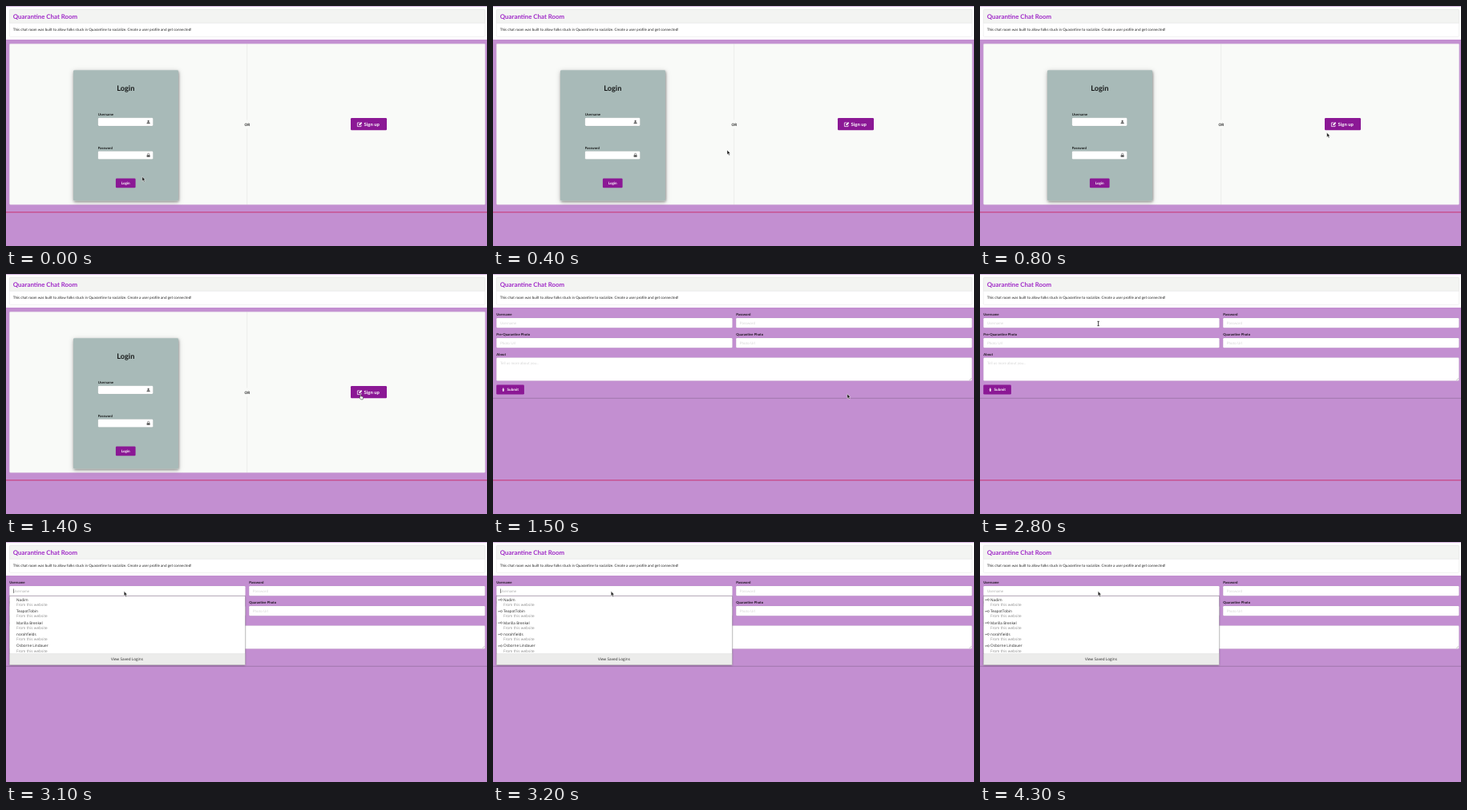
Animation, 600 px wide and 300 px high, one loop 5000 ms. Source, as an HTML page:

```html
<!DOCTYPE html>
<html lang="en">
<head>
<meta charset="utf-8">
<title>Quarantine Chat Room</title>
<style>
  html, body { margin: 0; width: 100%; height: 100%; overflow: hidden; background: #c38fd1; }
  svg { display: block; width: 100vw; height: 100vh; }
  text { font-family: Lato, sans-serif; text-rendering: geometricPrecision; fill: rgba(0,0,0,.87); white-space: pre; }
  .b { font-weight: 700; }
  .w { fill: #fff; }
  .mid { text-anchor: middle; }
  .hint { fill: #d6d6d6; }
  .ui { font-family: "Open Sans", "Noto Sans", sans-serif; fill: #262626; }
  .sub { fill: #8c8c8c; }
  .field { fill: #fff; stroke: #222426; stroke-opacity: .15; stroke-width: .33; }
  .btn { fill: #8b1895; }
  .line { fill: none; stroke: #222426; stroke-opacity: .15; stroke-width: .4; }
</style>
</head>
<body>
<svg id="stage" viewBox="0 0 600 300" preserveAspectRatio="none" xmlns="http://www.w3.org/2000/svg"></svg>
<script>
const BASE = 4.585, LABEL = 4.26, UI = 4.7;
const LOOP = 5000, STEP = 100;

const text = (x, y, size, str, cls = '') =>
  `<text x="${x}" y="${y}" font-size="${size}" class="${cls}">${str}</text>`;
const rect = (x, y, w, h, attrs = '') =>
  `<rect x="${x}" y="${y}" width="${w}" height="${h}" ${attrs}/>`;
const path = (d, attrs = '') => `<path d="${d}" ${attrs}/>`;
const group = (id, body) => `<g id="${id}">${body}</g>`;
const field = (x, y, w, h) => rect(x, y, w, h, 'rx="1.3" class="field"');
const button = (x, y, w, h) => rect(x, y, w, h, 'rx="1.3" class="btn"');

function header() {
  return rect(0, 0, 600, 42, 'fill="#fff"') +
    rect(0, 0, 600, .8, 'fill="#c9a0d5"') +
    rect(4.3, 4.3, 593.3, 34, 'rx="1" fill="#fff"') +
    rect(4.3, 4.3, 593.3, 17, 'rx="1" fill="#f3f4f2"') +
    rect(4.3, 4.3, 593.3, 34, 'rx="1" class="line"') +
    path('M4.3 21.3H597.6', 'class="line"') +
    text(8.8, 15.6, 7.86, 'Quarantine Chat Room', 'b" style="fill:#a02bc8') +
    text(8.8, 31.4, BASE, 'This chat room was built to allow folks stuck in Quarantine to socialize. Create a user profile and get connected!');
}

function loginPage() {
  const userIcon = '<circle cx="177.6" cy="143.9" r="1.1"/>' +
    path('M175.5 147.1V146.4Q175.6 145.2 177.6 145.2T179.7 146.4V147.1Z');
  const lockIcon = rect(175.6, 186.2, 4, 2.6, 'rx=".3"') +
    path('M176.5 186.2V185.3A1.1 1.1 0 0 1 178.7 185.3V186.2', 'fill="none" stroke="#555" stroke-width=".6"');
  const editIcon = path('M441.3 145.9H438.4V150.6H443V148.6', 'fill="none" stroke="#fff" stroke-width=".75"') +
    path('M440.2 149.2L440.4 147.7L443 145L444.2 146.2L441.6 148.9Z', 'fill="#fff"');
  return rect(4.3, 47.2, 593.4, 201.1, 'rx="1.2" fill="#f9faf8" stroke="#d9c9de" stroke-width=".4"') +
    path('M300.7 47.4V142.5M300.7 153.3V248.2', 'class="line"') +
    text(300.8, 149.6, BASE, 'OR', 'b mid') +
    rect(84, 80.2, 131, 163, 'rx="1.2" fill="#a8bab8" filter="url(#shade)"') +
    text(149.3, 106, 9.17, 'Login', 'b mid') +
    text(114.8, 136.8, LABEL, 'Username', 'b') + field(114.8, 139.7, 68.6, 10.2) +
    text(114.8, 178.6, LABEL, 'Password', 'b') + field(114.8, 181.4, 68.6, 10.2) +
    `<g fill="#555">${userIcon}${lockIcon}</g>` +
    button(136.9, 215.4, 24.7, 11.8) + text(149.2, 222.9, BASE, 'Login', 'b w mid') +
    button(430, 140, 45, 15.3) + editIcon + text(446.6, 149.8, 5.9, 'Sign up', 'b w');
}

function formPage() {
  const inputs = [
    [4.3, 55, 'Username', 'Username'], [303.2, 55, 'Password', 'Password'],
    [4.3, 80, 'Pre-Quarantine Photo', 'Photo Url'], [303.2, 80, 'Quarantine Photo', 'Photo Url']
  ];
  return inputs.map(([x, y, label, hint], i) =>
    text(x, y - 3.3, LABEL, label, 'b') + field(x, y, 294.3, 12.3) +
    text(x + 4.6, y + 7.8, BASE, hint, i ? 'hint' : 'hint" id="userHint')).join('') +
    text(4.3, 101.7, LABEL, 'About', 'b') + field(4.3, 104.6, 593.2, 29) +
    text(8.9, 112.7, BASE, 'Tell us more about you...', 'hint') +
    path('M594 132.9L596.9 130M595.6 132.9L596.9 131.6', 'stroke="#777" stroke-width=".35"') +
    button(4.2, 138.6, 34.7, 11.9) +
    '<circle cx="12.8" cy="143.3" r=".8" class="w"/>' +
    path('M11.6 144.2H14V145.3H13.5V146.7H12.1V145.3H11.6Z', 'class="w"') +
    text(17.6, 146.2, BASE, 'Submit', 'b w') +
    path('M0 155.3H600', 'stroke="#000" stroke-opacity=".3" stroke-width=".6"');
}

function popup() {
  const names = ['Nadim', 'TeapotTobin', 'Marilla Brenkel', 'norahfields', 'Osborne Lindauer'];
  const rowY = i => 72 + i * 14.4;
  const rows = names.map((name, i) =>
    text(13, rowY(i) + 1.7, UI, name, 'ui') +
    text(13, rowY(i) + 8, UI, 'From this website', 'ui sub')).join('');
  const keys = names.map((_, i) => {
    const y = rowY(i) + .2;
    return path(`M6.4 ${y}H9.3M7.2 ${y}v1`) + `<circle cx="10.4" cy="${y}" r="1.1"/>`;
  }).join('');
  return rect(4.4, 67.6, 293.8, 86, 'fill="#fff" filter="url(#drop)"') +
    rect(4.4, 139.6, 293.8, 14, 'fill="#ececeb"') +
    path('M4.4 139.6H298.2', 'class="line"') +
    rect(4.4, 67.6, 293.8, 86, 'fill="none" stroke="#8d8d8d" stroke-width=".4"') +
    rows + text(151, 148.3, UI, 'View Saved Logins', 'ui mid') +
    `<g id="keys" fill="none" stroke="#555" stroke-width=".6">${keys}</g>`;
}

function cursors() {
  return group('arrow', path('M0 0V5.7L1.3 4.6L2.3 6.8L3.4 6.3L2.4 4.2H4.1Z',
      'fill="#1a1a1a" stroke="#fff" stroke-width=".5" stroke-linejoin="round"')) +
    group('hand', path('M.9 .6Q1.5 -.1 2 .6V2.6L4.2 3.1Q4.9 3.3 4.8 4.1L4.3 6.6H1.7L0 4.2Q.1 3.5 .9 4Z',
      'fill="#fff" stroke="#1a1a1a" stroke-width=".5" stroke-linejoin="round"')) +
    group('beam', path('M-1.3 -2.7H1.3M0 -2.7V2.7M-1.3 2.7H1.3', 'stroke="#fff" stroke-width="1.3"') +
      path('M-1.2 -2.7H1.2M0 -2.7V2.7M-1.2 2.7H1.2', 'stroke="#111" stroke-width=".75"'));
}

const stage = document.getElementById('stage');
stage.innerHTML = `<defs>
  <filter id="shade" x="-20%" y="-20%" width="140%" height="140%">
    <feDropShadow dx=".6" dy="1.4" stdDeviation="1.4" flood-opacity=".4"/>
    <feDropShadow dx="0" dy="1.5" stdDeviation="3" flood-opacity=".18"/>
  </filter>
  <filter id="drop" x="-5%" y="-10%" width="110%" height="120%">
    <feDropShadow dx="0" dy=".6" stdDeviation=".8" flood-opacity=".4"/>
  </filter></defs>` +
  rect(0, 0, 600, 300, 'fill="#c38fd1"') + header() +
  group('login', loginPage()) + group('form', formPage()) +
  group('redLine', path('M0 257.8H600', 'stroke="#cb2a68" stroke-width=".9"')) +
  group('popup', popup()) +
  rect(9.2, 58.4, .5, 5.6, 'id="caret" fill="#222"') + cursors();

const el = id => document.getElementById(id);
const show = (id, on) => el(id).setAttribute('visibility', on ? 'visible' : 'hidden');

// Pointer positions: time, x, y
const track = [
  [0, 169.8, 213.2], [100, 152, 211.5], [200, 138.6, 205], [300, 205, 194], [400, 292, 180],
  [500, 374, 168.5], [600, 423.6, 163.2], [700, 428.2, 161], [800, 432.6, 158.2],
  [900, 437, 153], [1000, 440.8, 148.6], [1100, 440.8, 150.2], [1400, 440.8, 150.2],
  [1500, 441.8, 149.8], [1900, 441.8, 149.8], [2000, 418, 144], [2100, 354, 127],
  [2200, 275, 106.5], [2300, 207, 88], [2400, 163, 76], [2500, 148.4, 72.2],
  [2600, 148.2, 68.6], [2700, 147.8, 64.5], [2800, 147.6, 62], [3000, 147.6, 62],
  [3100, 147.2, 61.6]
];

function pointer(t) {
  const i = track.findIndex(k => k[0] > t);
  if (i < 0) return track[track.length - 1].slice(1);
  const [t0, x0, y0] = track[i - 1], [t1, x1, y1] = track[i];
  const f = (t - t0) / (t1 - t0);
  return [x0 + (x1 - x0) * f, y0 + (y1 - y0) * f];
}

function pointerKind(t, x, y) {
  if (t < 1500) return x > 430 && x < 475 && y > 140 && y < 155.3 ? 'hand' : 'arrow';
  const overField = [[55, 67.3], [80, 92.3], [104.6, 133.6]].some(([a, b]) => y > a && y < b);
  return t < 3100 && overField ? 'beam' : 'arrow';
}

function draw(time) {
  const t = Math.floor(time / STEP) * STEP;
  const open = t >= 3100;
  show('login', t < 1500);
  show('form', t >= 1500);
  show('redLine', !open);
  show('popup', open);
  show('keys', t >= 3200);
  show('caret', open && t < 4300);
  el('userHint').style.fill = open ? '#adadad' : '';

  const [x, y] = pointer(t);
  const kind = pointerKind(t, x, y);
  for (const id of ['arrow', 'hand', 'beam']) show(id, id === kind);
  el(kind).setAttribute('transform', `translate(${x} ${y})`);
}

const start = performance.now();
function tick() {
  draw((performance.now() - start) % LOOP);
  requestAnimationFrame(tick);
}
tick();
</script>
</body>
</html>
```
